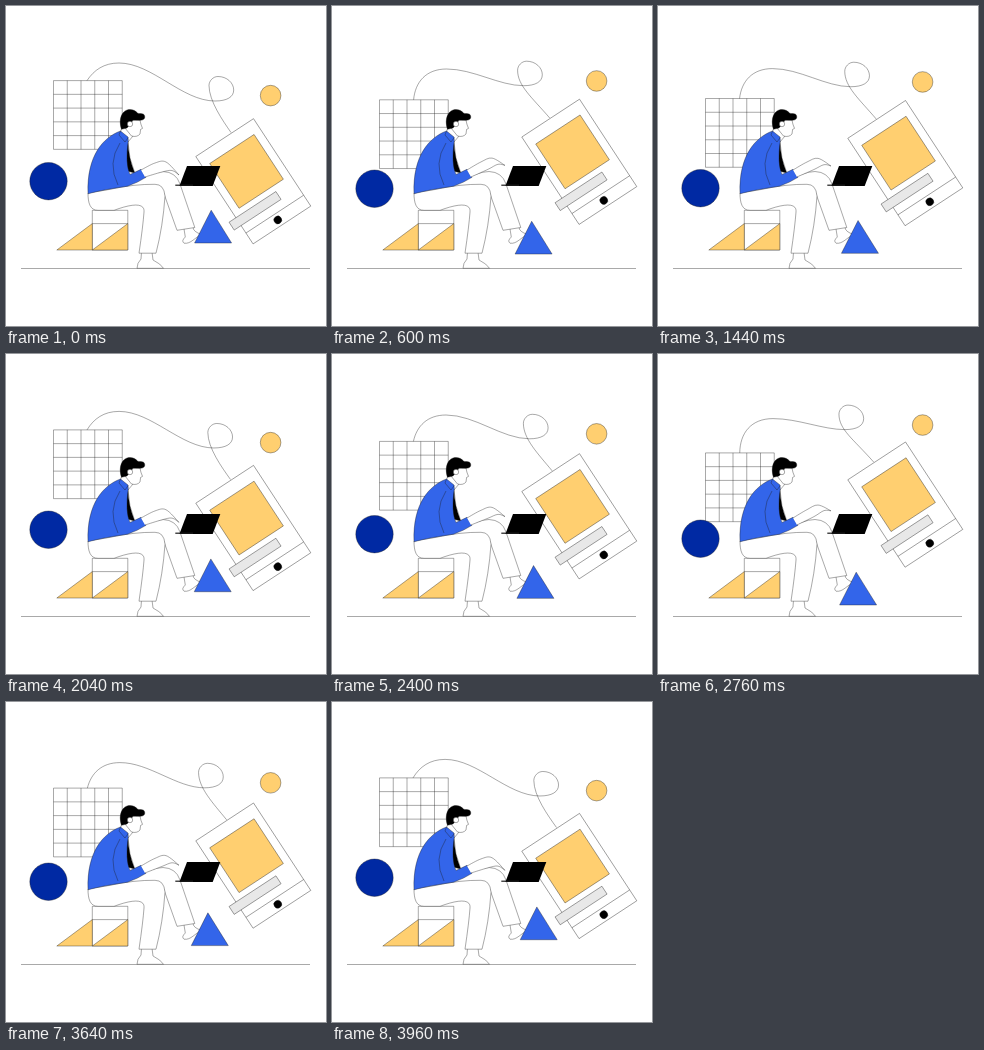
An HTML page with a canvas for the animation above (4000 ms loop, 320x320 px).

```html
<!DOCTYPE html>
<html lang="en">
<head>
<meta charset="utf-8">
<title>Man with laptop</title>
<style>
html, body { margin: 0; width: 100%; height: 100%; overflow: hidden; background: #fff; }
canvas { display: block; width: 100vw; height: 100vh; }
</style>
</head>
<body>
<canvas id="stage"></canvas>
<script>
const SIZE = 320, STEP = 40, HALF = 1000, LINE = 0.38;
const INK = '#1c1c1c', BLUE = '#3365ea', NAVY = '#0029a3', GOLD = '#ffcf70';
const GREY = '#e8e8e8', BLACK = '#000', WHITE = '#fff';
const canvas = document.getElementById('stage');
const ctx = canvas.getContext('2d');

function paint(path, fill, width = LINE) {
  if (fill) {
    ctx.fillStyle = fill;
    ctx.fill(path);
  }
  if (width) {
    ctx.strokeStyle = INK;
    ctx.lineWidth = width;
    ctx.stroke(path);
  }
}

const shape = (d, fill, width) => paint(new Path2D(d), fill, width);
const box = (x, y, w, h, fill, width) => shape(`M${x} ${y}h${w}v${h}h${-w}Z`, fill, width);

function disc(x, y, r, fill) {
  const path = new Path2D();
  path.arc(x, y, r, 0, Math.PI * 2);
  paint(path, fill);
}

function placed(x, y, angle, skew, draw) {
  ctx.save();
  ctx.translate(x, y);
  ctx.rotate(angle);
  ctx.transform(1, 0, skew, 1, 0, 0);
  draw();
  ctx.restore();
}

// Smooth line through the points, continuing the given path.
function spline(path, points) {
  const at = i => points[Math.max(0, Math.min(points.length - 1, i))];
  path.lineTo(...at(0));
  for (let i = 0; i < points.length - 1; i++) {
    const [a, b, c, d] = [at(i - 1), at(i), at(i + 1), at(i + 2)];
    path.bezierCurveTo(
      b[0] + (c[0] - a[0]) / 6, b[1] + (c[1] - a[1]) / 6,
      c[0] - (d[0] - b[0]) / 6, c[1] - (d[1] - b[1]) / 6, ...c);
  }
}

function grid(p) {
  const x = 47.5, y = 74.6 + 32 * p, cell = 13.75, side = 5 * cell;
  let d = '';
  for (let i = 0; i <= 5; i++) {
    d += `M${x + i * cell} ${y}v${side}M${x} ${y + i * cell}h${side}`;
  }
  shape(d);
}

// Rises from the grid to a crest, dips, loops once and runs into the device.
function cable(p) {
  const path = new Path2D();
  const crestX = 113 + 2.6 * p, crestY = 57 + 10 * p;
  const x = 209 - 29 * p, y = 95 - 25.5 * p;
  const endX = 225 - 12 * p, endY = 126.5 - 24 * p;
  path.moveTo(81 + p, 74.6 + 32 * p);
  path.bezierCurveTo(88 - 8 * p, 64 + 20 * p, 98 - 6.6 * p, crestY, crestX, crestY);
  path.bezierCurveTo(crestX + 33 - 10 * p, crestY, x - 33 + 14 * p, y, x, y);
  path.bezierCurveTo(x + 12, y, x + 18.7, y - 4, x + 18.7, y - 11);
  path.bezierCurveTo(x + 18.7, y - 18, x + 12, y - 24.5, x + 3, y - 24.5);
  path.bezierCurveTo(x - 2, y - 24.5, x - 6, y - 20, x - 6, y - 15.5);
  path.bezierCurveTo(x - 6, y, endX - 8 - 17 * p, endY - 11.5 - 16 * p, endX, endY);
  paint(path);
}

function device(p) {
  placed(189.8, 150.5 - 32.5 * p, -0.58, 0, () => {
    box(0, 0, 69, 104.5, WHITE);
    shape('M0 91.5h69');
    box(7.8, 13.5, 53, 53.5, GOLD);
    box(-8.2, 73.2, 56, 9.4, GREY);
    disc(33.8, 98, 3.9, BLACK);
  });
}

function seat() {
  const x = 86.3, side = 35.5, floor = 244, rise = 26.4;
  box(x, 204.3, side, floor - 204.3, WHITE);
  shape(`M${x} ${floor - rise}h${side}`);
  for (const left of [x - side, x]) {
    shape(`M${left} ${floor}l${side} ${-rise}v${rise}Z`, GOLD);
  }
}

function legs() {
  // crossed leg
  shape('M178 223L179.3 231Q175 235 178 237.2C185 238.3 189 231 196 228.5Q187 226 187 221', WHITE);
  shape('M124 178Q145 165.5 157 165.5Q170 166 174 178L188.8 221.5L171 224.3L157 185', WHITE);
  // standing leg
  shape('M135.5 246L135 253Q131 257 131 262.3H157.5Q155 258 147 254L146 246', WHITE);
  shape('M82 187C82 197 84 204.3 92 204.3H108C125 198 139 196 138 206Q137 220 133 247.2H150Q157 220 159 190Q158 178.3 149 178.3Q128 178 103 183.5Z', WHITE);
}

function torso() {
  shape('M116 121L114.5 126L122 136L127 130L125 121Z', WHITE);
  shape('M121 133Q119.5 150 121 165L128.8 167Q122.5 152 122 136Z', BLACK);
  shape('M114.5 125C98 131 80.5 149 82 187.8Q95 184 121.5 180.2Q132 176.5 140 171.3L135 163.3L124 168.5Q119 158 122.3 134.5L122 131Z', BLUE);
  shape('M114 137Q101 157 112 179M114.5 125L113 129L119 136L122.3 131.5');
}

function head() {
  shape('M122 113L134 114Q134.5 118 136.5 122.4L134.6 123.4L134 128Q131 131.5 125.5 130L119 122Z', WHITE);
  shape('M115.5 123.3C112 113 116 103.5 124 103.5Q129 103.5 131.5 107C134 108.5 138.5 106 138.8 111C138.5 115 134 114.3 127 114.3Q124 119 121 122Z', BLACK);
  disc(124, 118, 2.7, WHITE);
}

function laptop() {
  placed(181, 160, 0, -0.38, () => box(0, 0, 33.3, 20, BLACK, 0));
  shape('M169.3 179.2H187', null, 1.2);
}

// The hand lifts while the cuff stays: the bend grows with distance.
function arm(p) {
  const bend = ([x, y]) => [x, y - 16 * p * ((x - 137) / 36) ** 2];
  const back = [[135, 164], [149, 157], [160, 156], [173, 169]];
  const palm = [[173, 169], [166, 164.5], [156, 166], [139, 171]];
  const path = new Path2D();
  spline(path, back.map(bend));
  spline(path, palm.map(bend));
  paint(path, WHITE);
}

const triangle = p => shape(`M${205.2 - 9.2 * p} ${204.2 + 18.4 * p}l20.4 32.8h-37Z`, BLUE);

function draw(p) {
  shape('M15 262.5H304');
  grid(p);
  cable(p);
  device(p);
  disc(42.5, 175.2 + 12.5 * p, 18.7, NAVY);
  disc(264.6, 89.6 - 24.4 * p, 10.3, GOLD);
  seat();
  legs();
  torso();
  head();
  laptop();
  arm(p);
  triangle(p);
}

function resize() {
  const ratio = window.devicePixelRatio || 1;
  canvas.width = Math.round(innerWidth * ratio);
  canvas.height = Math.round(innerHeight * ratio);
}

function frame() {
  const t = Math.floor(performance.now() / STEP) * STEP % (2 * HALF);
  const p = 1 - Math.abs(t / HALF - 1);
  ctx.setTransform(1, 0, 0, 1, 0, 0);
  ctx.fillStyle = WHITE;
  ctx.fillRect(0, 0, canvas.width, canvas.height);
  ctx.setTransform(canvas.width / SIZE, 0, 0, canvas.height / SIZE, 0, 0);
  ctx.lineJoin = 'round';
  draw(p);
  requestAnimationFrame(frame);
}

addEventListener('resize', resize);
resize();
frame();
</script>
</body>
</html>
```
